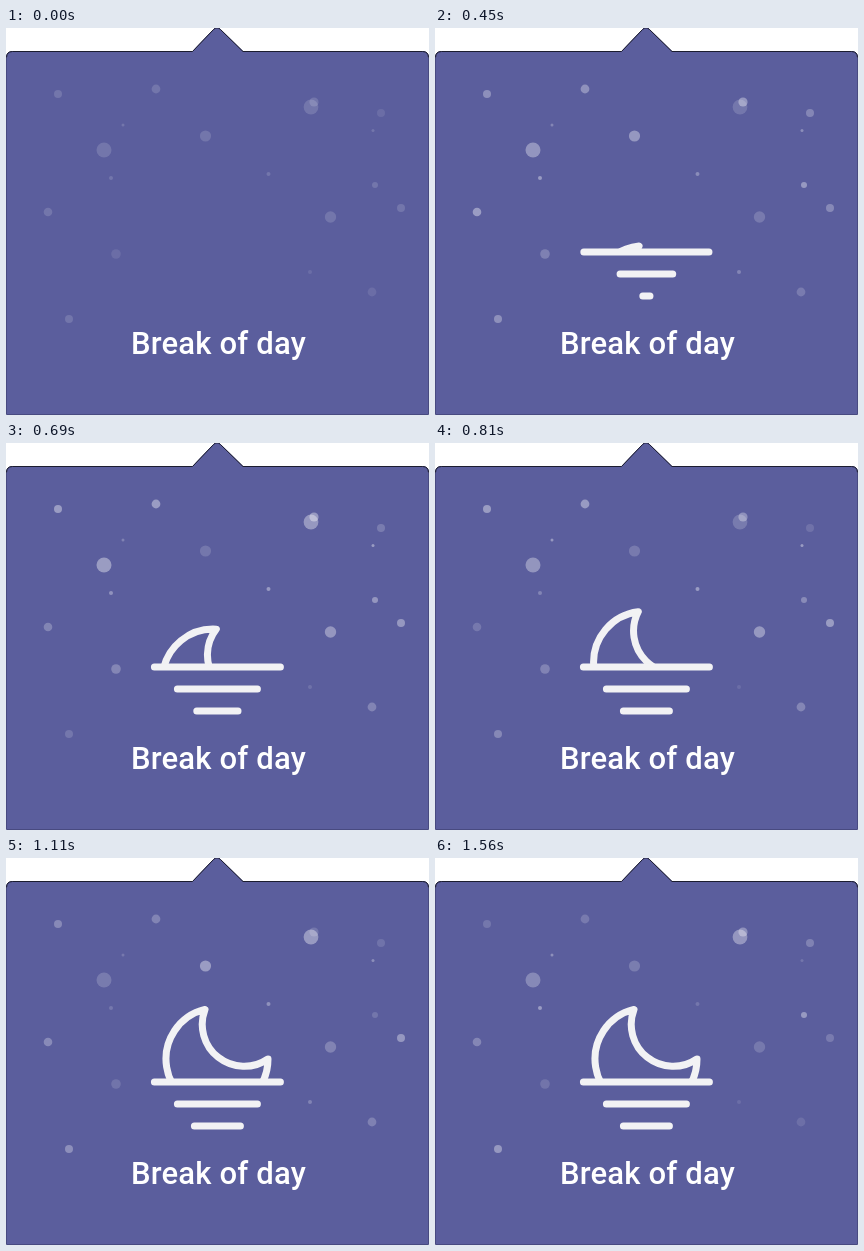
These frames come from a looping animation (423 by 387 pixels, 1620 ms). An HTML page:

```html
<!DOCTYPE html>
<html lang="en">
<head>
<meta charset="utf-8">
<title>Break of day</title>
<style>
  html, body { margin: 0; width: 100%; height: 100%; overflow: hidden; background: #fff; }
  svg { display: block; width: 423px; height: 387px; }
  text { font: 500 31px Roboto, "Open Sans", sans-serif; letter-spacing: .15px; fill: #fff; text-anchor: middle; }
  .ink { fill: none; stroke: #f2f2f4; stroke-width: 7; stroke-linecap: round; stroke-linejoin: round; }
  .faint { fill-opacity: .65; }
</style>
</head>
<body>
<svg viewBox="0 0 423 387">
  <clipPath id="sky"><rect width="423" height="224"/></clipPath>
  <path fill="#5b5e9d" stroke="#484a80" d="M.5 386.5V29.5Q.5 23.5 6.5 23.5H186.5L207.5 1.5Q211 -2 214.5 1.5L237 23.5H416.5Q422.5 23.5 422.5 29.5V386.5Z"/>
  <path fill="none" stroke="#1c1d30" d="M.5 29.5Q.5 23.5 6.5 23.5H186.5L207.5 1.5Q211 -2 214.5 1.5L237 23.5H416.5Q422.5 23.5 422.5 29.5"/>
  <!-- Stars, from the quickest twinkle to the slowest -->
  <g id="stars" fill="#fff">
    <circle cx="305" cy="79" r="7.4"/>
    <circle cx="324.5" cy="189" r="5.7"/>
    <circle cx="117" cy="97" r="1.5"/>
    <circle cx="63" cy="291" r="4"/>
    <circle cx="199.5" cy="108" r="5.6"/>
    <circle cx="304" cy="244" r="2" class="faint"/>
    <circle cx="42" cy="184" r="4.3"/>
    <circle cx="375" cy="85" r="4" class="faint"/>
    <circle cx="105" cy="150" r="2"/>
    <circle cx="369" cy="157" r="3"/>
    <circle cx="308" cy="74" r="4.6"/>
    <circle cx="98" cy="122" r="7.5"/>
    <circle cx="110" cy="226" r="4.8" class="faint"/>
    <circle cx="150" cy="61" r="4.4"/>
    <circle cx="52" cy="66" r="4"/>
    <circle cx="367" cy="102.5" r="1.5"/>
    <circle cx="262.5" cy="146" r="2"/>
    <circle cx="366" cy="264" r="4.4" class="faint"/>
    <circle cx="395" cy="180" r="4"/>
  </g>
  <g clip-path="url(#sky)">
    <path id="moon" class="ink" d="M-12 -49.6A51 51 0 1 0 51 0A42 42 0 0 1 -12 -49.6Z"/>
  </g>
  <path id="water" class="ink"/>
  <text x="212.5" y="326">Break of day</text>
</svg>
<script>
const LOOP = 1620;
const halfWidths = [63, 40, 23];
const stars = [...document.querySelectorAll("#stars circle")];
const moon = document.getElementById("moon");
const water = document.getElementById("water");

function ease(t, start, duration) {
  const p = Math.min(1, Math.max(0, (t - start) / duration));
  return (1 - Math.cos(Math.PI * p)) / 2;
}

function drawStars(t) {
  stars.forEach((star, i) => {
    const period = 430 + 75 * i;
    const glow = (1 - Math.cos(2 * Math.PI * t / period)) / 2;
    star.setAttribute("opacity", .15 + .24 * glow);
  });
}

// The lines grow from their middle, one after another.
function drawWater(t) {
  water.setAttribute("d", halfWidths.map((half, i) => {
    const h = half * ease(t, 25 + 155 * i, 450);
    return h && `M${211.4 - h} ${224 + 22 * i}h${2 * h}`;
  }).filter(Boolean).join(""));
}

// The moon leans right while it rises, then swings back upright.
function drawMoon(t) {
  const tilt = 17 * (ease(t, 240, 450) - ease(t, 690, 210));
  const x = 211 - .22 * tilt;
  const y = 275 - 74 * ease(t, 310, 750);
  moon.setAttribute("transform", `translate(${x} ${y}) rotate(${tilt})`);
  moon.setAttribute("visibility", t < 310 ? "hidden" : "visible");
}

function draw() {
  const t = performance.now() % LOOP;
  drawStars(t);
  drawWater(t);
  drawMoon(t);
  requestAnimationFrame(draw);
}
draw();
</script>
</body>
</html>
```
